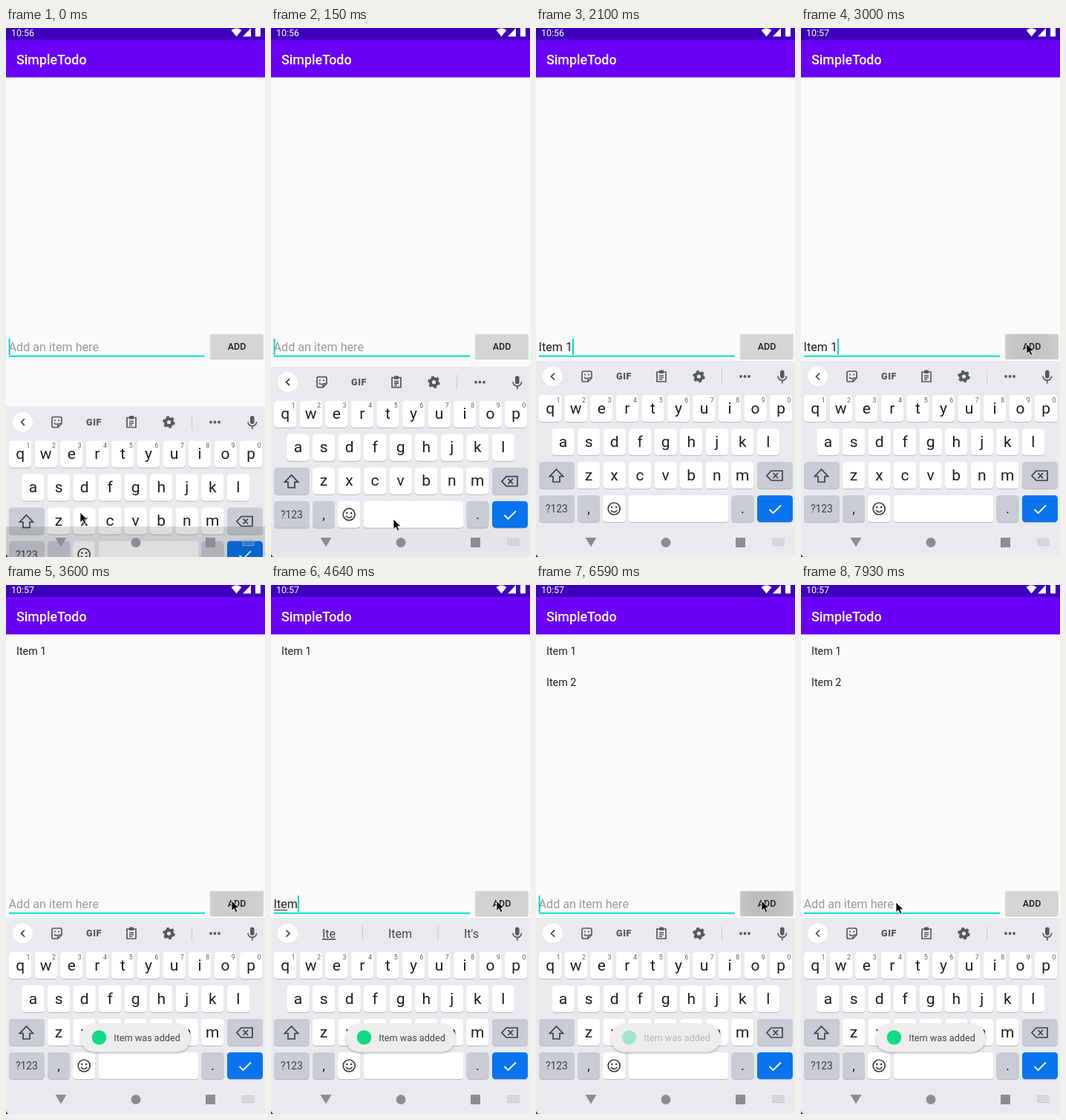
An HTML page that plays this animation: 349 px wide and 712 px high, repeating every 8 s.

```html
<!DOCTYPE html>
<html lang="en">
<head>
<meta charset="utf-8">
<title>Todo list</title>
<style>
html, body { margin: 0; width: 100%; height: 100%; overflow: hidden; background: #fafafa; }
svg { display: block; width: 349px; height: 712px; font-family: Roboto, sans-serif; }
text { white-space: pre; }
.mid { text-anchor: middle; }
.line { fill: none; stroke: #55585d; stroke-width: 1.7; }
.dark { stroke: #3c4043; }
</style>
</head>
<body>
<svg id="stage" viewBox="0 0 349 712"></svg>
<script>
const text = (x, y, size, s, fill, more = '') =>
  `<text x="${x}" y="${y}" font-size="${size}" fill="${fill}" ${more}>${s}</text>`;
const mid = (x, y, size, s, fill, more = '') => text(x, y, size, s, fill, 'class="mid" ' + more);
const rect = (x, y, w, h, fill, more = '') =>
  `<rect x="${x}" y="${y}" width="${w}" height="${h}" fill="${fill}" ${more}/>`;
const disc = (x, y, r, fill, more = '') => `<circle cx="${x}" cy="${y}" r="${r}" fill="${fill}" ${more}/>`;
const line = (d, more = '') => `<path class="line ${more}" d="${d}"/>`;
const shape = (d, fill) => `<path d="${d}" fill="${fill}"/>`;

const key = (x, y, w, fill = '#fff') =>
  rect(x, y + 1, w, 36, '#b9bbc0', 'rx="4.5"') + rect(x, y, w, 36, fill, 'rx="4.5"');
const letters = (row, x0, y) => [...row].map((c, i) => {
  const x = x0 + i * 34.55;
  return key(x - 15.2, y, 30.4) + mid(x, y + 24.5, 21, c, '#1f1f1f');
}).join('');
const digits = [...'1234567890'].map((c, i) => mid(30 + i * 34.55, 503.5, 9, c, '#5f6368')).join('');
const GREY = '#c9ccd4', ICON = '#55585d';

const toolbar = `<g id="tools">
  ${line('M25 464.5l-4.5 4.5l4.5 4.5', 'dark')}
  ${line('M64 462h9q2 0 2 2v7l-5 5h-6q-2 0-2-2v-10q0-2 2-2zM75 471h-3q-2 0-2 2v3M65 470q2 3 4 1')}
  ${disc(66, 466.5, 1.1, ICON)}${disc(71, 466.5, 1.1, ICON)}
  ${mid(118.5, 473, 12.5, 'GIF', ICON, 'font-weight="900" letter-spacing=".6"')}
  ${line('M163 463h12v13h-12zM166 468h6M166 470.5h6M166 473h4')}${rect(166, 460.5, 6, 4.5, ICON, 'rx="1"')}
  ${disc(219.5, 469, 4.6, 'none', `stroke="${ICON}" stroke-width="4"`)}
  ${disc(219.5, 469, 7.1, 'none', `stroke="${ICON}" stroke-width="2.4" stroke-dasharray="3.7 3.73"`)}
  ${rect(250, 459, 1, 20, '#c8cacd')}
  ${[276, 281.5, 287].map(x => disc(x, 469, 1.9, ICON)).join('')}
</g>
<g id="words">
  ${line('M20.5 464.5l4.5 4.5l-4.5 4.5', 'dark')}
  ${rect(123, 458, 1, 22, '#c8cacd')}${rect(224.5, 458, 1, 22, '#c8cacd')}
  ${mid(78, 475, 16, '', '#44474c', 'text-decoration="underline"')}
  ${mid(174, 475, 16, '', '#44474c')}${mid(270, 475, 16, '', '#44474c')}
</g>
${rect(329, 460.5, 5.6, 11, ICON, 'rx="2.8"')}${line('M326 468.5a5.8 5.8 0 0 0 11.6 0M331.8 474.5v4')}`;

const keyboard = `<g id="keyboard">
  ${rect(0, 448, 349, 266, '#e8eaed')}${disc(22.5, 469.5, 13.5, '#cfd1d4')}${disc(22.5, 469, 13.5, '#fff')}
  ${toolbar}
  ${letters('qwertyuiop', 19.2, 494)}${digits}
  ${letters('asdfghjkl', 36.5, 539)}${letters('zxcvbnm', 71, 584)}
  ${key(4, 584, 48, GREY)}${line('M27.5 594l9 9.5h-4.5v7.5h-9v-7.5h-4.5z', 'dark')}
  ${key(298, 584, 48, GREY)}${line('M317 596h15v13h-15l-6-6.5zM319.5 599l6.5 7M326 599l-6.5 7', 'dark')}
  ${key(4, 629, 48, GREY)}${mid(28, 652, 13.8, '?123', '#3c4043')}
  ${key(56, 629, 30, GREY)}${mid(71, 653, 19, ',', '#222')}
  ${key(90, 629, 30.4)}${disc(105.2, 647, 8, 'none', 'class="line dark"')}
  ${disc(102.3, 645, 1.3, '#3c4043')}${disc(108.1, 645, 1.3, '#3c4043')}${line('M101 649q4.2 5 8.4 0', 'dark')}
  ${key(124.5, 629, 135)}
  ${key(263.5, 629, 30, GREY)}${mid(278.5, 653, 19, '.', '#222')}
  ${key(298, 629, 48, '#0a74ee')}
  <path d="M314.5 648l5 5l10.5-10.500" fill="none" stroke="#fff" stroke-width="1.9"/>
</g>`;

const navDots = [0, 1, 2].map(r => [0, 1, 2, 3, 4].map(c =>
  rect(320.5 + c * 2.6, 689 + r * 2.4, 1.4, 1.3, '#aaacb0')).join('')).join('');
const nav = `${rect(0, 671, 349, 41, '#000', 'id="scrim"')}
  ${shape('M66.500 686h15l-7.500 12.500z', '#8c8d91')}${disc(175, 692.500, 6.500, '#8c8d91')}
  ${rect(269, 686, 13, 13, '#8c8d91')}${navDots}
  ${rect(319, 687.500, 15, 9, 'none', 'stroke="#b9bbbf" stroke-width=".8"')}
  ${shape('M0 708q1 3 4 4h-4z', '#333')}`;

const stage = document.getElementById('stage');
stage.innerHTML = `
  <defs>
    <filter id="soft" x="-20%" y="-40%" width="140%" height="200%">
      <feDropShadow dx="0" dy="1.500" stdDeviation="1.700" flood-opacity=".3"/></filter>
    <radialGradient id="glow"><stop offset=".5" stop-opacity="1"/><stop offset="1" stop-opacity="0"/></radialGradient>
    <clipPath id="edge">${rect(275, 412, 72, 33, '#000')}</clipPath>
  </defs>
  ${rect(0, 0, 349, 712, '#fafafa')}
  ${rect(0, 0, 349, 16.500, '#3e00ba')}${rect(0, 16, 349, 50.500, '#6a00f8')}
  ${text(7, 11, 12.5, '', '#fff', 'id="clock"')}
  ${shape('M303.500 3q7-5.500 14 0l-7 8.500z', '#fff')}${shape('M330 0v11.500h-11z', '#fff')}${rect(336, 0, 7, 11.5, '#fff', 'rx="1"')}
  ${text(14, 48.5, 17.86, 'SimpleTodo', '#fff', 'font-weight="500"')}
  ${text(14, 93.5, 14.3, 'Item 1', '#212121', 'id="item1"')}
  ${text(14, 136.3, 14.3, 'Item 2', '#212121', 'id="item2"')}
  ${text(3.6, 435, 16.1, 'Add an item here', '#9a9a9a', 'id="hint"')}
  ${text(3.6, 435, 16.1, '', '#212121', 'id="input"')}
  ${rect(4, 437, 0, 1, '#333', 'id="mark"')}
  ${rect(4, 440.7, 264, 2, '#03dac5')}
  ${rect(3.6, 418, 2, 22, '#03dac5', 'id="caret"')}
  ${rect(275, 412, 72, 33.500, '#d4d5d5', 'rx="1.500" stroke="#e8e8e8" stroke-width=".8"')}${rect(276, 445, 70, 1, '#c4c4c4')}
  <g id="press" clip-path="url(#edge)">${rect(275, 412, 72, 33, '#000', 'opacity=".4"')}
    ${disc(308, 429, 38, 'url(#glow)', 'opacity=".6"')}</g>
  ${mid(311, 433, 12.5, 'ADD', '#1e1e1e', 'font-weight="500"')}
  ${keyboard}${nav}
  <g id="toast">${rect(100.500, 590, 148, 38.500, '#ededee', 'rx="19.200" filter="url(#soft)"')}
    <g id="note">${disc(125.500, 609, 9.800, '#0fdb86')}${text(145.3, 613.6, 12.65, 'Item was added', '#454545')}</g></g>
  <path id="mouse" d="M0 0v13.500l3.200-2.900 2.200 5 2.400-1-2.200-4.900h4.300z" stroke="#fff" stroke-width=".8"/>`;

const el = id => document.getElementById(id);
const show = (id, on) => el(id).setAttribute('opacity', +on);
const at = (track, t) => track.findLast(k => k[0] <= t);

// time, input text, underlined letters, suggestions ('' shows the tools)
const typing = [
  [0, '', 0, ''], [750, 'I', 1, ''], [900, 'I', 1, "I,I'm,It's"], [1200, 'It', 1, "I,I'm,It's"],
  [1350, 'Ite', 2, "It,Item,It's"], [1500, 'Item', 3, "Ite,Item,It's"], [1650, 'Item ', 0, "Item,Items,Item's"],
  [1800, 'Item 1', 0, "Item,Items,Item's"], [2100, 'Item 1', 0, ''], [3150, '', 0, ''],
  [4040, 'I', 1, ''], [4190, 'It', 1, "I,I'm,It's"], [4490, 'Ite', 2, "It,Item,It's"],
  [4640, 'Item', 3, "Ite,Item,It's"], [4940, 'Item', 4, "Item,Items,Item's"], [5240, 'Item ', 0, "Item,Items,Item's"],
  [5540, 'Item 2', 0, "Item,Items,Item's"], [5840, 'Item 2', 0, ''], [6590, '', 0, '']];
const blink = [[0, 1], [450, 0], [750, 1], [2400, 0], [2850, 1], [3600, 0], [4040, 1], [7040, 0], [7490, 1], [7930, 0]];
const mouse = [
  [0, 100, 652], [150, 165, 661], [300, 285, 678], [450, 341, 684], [2100, 400, 684], [2400, 338, 540],
  [2550, 311, 450], [2700, 304, 425], [7040, 270, 424], [7190, 195, 419], [7340, 150, 416],
  [7490, 143, 418], [7640, 135, 423], [7790, 128, 427]];
const press = [
  [0, 0], [2850, .04], [3000, .1], [3150, .13], [3300, .09], [3450, .06], [3600, .05], [4040, .03], [4190, .015],
  [6440, .07], [6590, .14], [6740, .1], [6890, .05], [7040, .02], [7190, 0]];
// time, bubble opacity, content opacity
const toast = [
  [0, 0, 0], [3150, 1, .35], [3300, 1, .85], [3450, 1, 1], [5240, .6, .5], [5390, 0, 0],
  [6590, 1, .33], [6740, 1, .85], [6890, 1, 1]];

// The screen refreshes every 150 ms, with a pause before 4040
const snap = t => t >= 7930 ? 7930
  : t >= 4040 ? 4040 + Math.floor((t - 4040) / 150) * 150
  : Math.min(3600, Math.floor(t / 150) * 150);

function draw(now) {
  const t = snap(now % 8000);
  const [, typed, marked, words] = at(typing, t);
  const input = el('input');
  input.textContent = typed;
  const width = typed ? input.getComputedTextLength() : 0;
  el('mark').setAttribute('width', marked ? input.getSubStringLength(0, marked) : 0);
  el('caret').setAttribute('x', 3.6 + width);
  show('caret', at(blink, t)[1]);
  show('hint', !typed);
  show('tools', !words);
  show('words', words);
  el('words').style.display = words ? '' : 'none';
  const list = words.split(',');
  el('words').querySelectorAll('text').forEach((n, i) => n.textContent = list[i] || '');

  el('clock').textContent = t < 2700 ? '10:56' : '10:57';
  show('item1', t >= 3150);
  show('item2', t >= 6590);
  show('press', at(press, t)[1]);
  const [, bubble, note] = at(toast, t);
  show('toast', bubble);
  show('note', note);

  const rise = Math.max(0, 1 - t / 300) ** 3;
  el('keyboard').setAttribute('transform', `translate(0 ${61.5 * rise})`);
  show('scrim', .13 * rise);
  const [, x, y] = at(mouse, t);
  el('mouse').setAttribute('transform', `translate(${x} ${y})`);
}

const start = performance.now();
function loop() {
  draw(performance.now() - start);
  requestAnimationFrame(loop);
}
loop();
</script>
</body>
</html>
```
